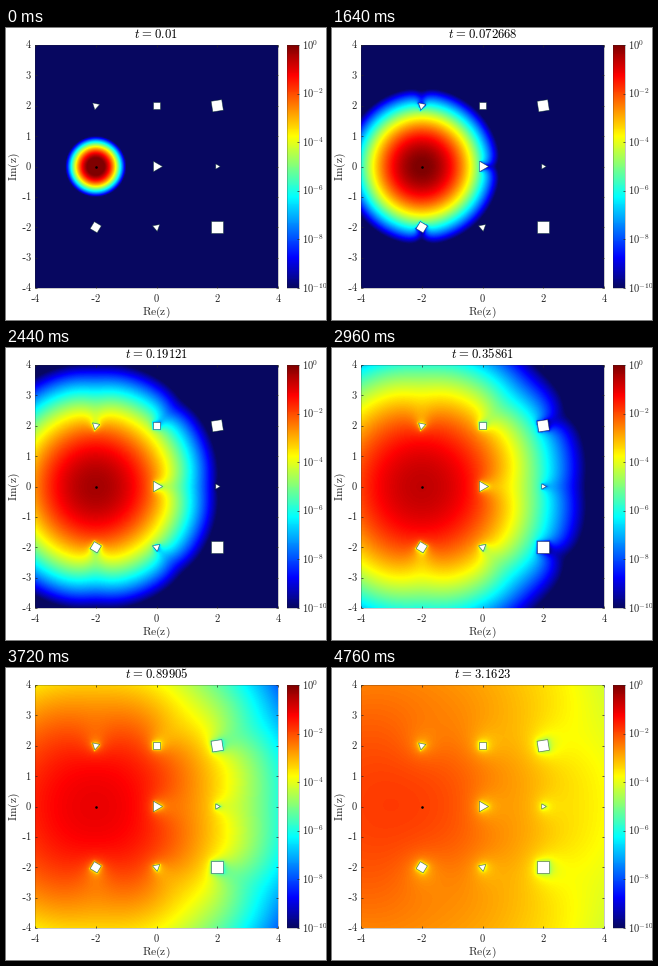
Recreate the animation shown at these times as a matplotlib script. Size 320 by 292 pixels, loop 4.8 s.

```python
import numpy as np
import matplotlib.pyplot as plt
from matplotlib.animation import FuncAnimation
from matplotlib.colors import LinearSegmentedColormap
from matplotlib.path import Path

plt.rcParams["mathtext.fontset"] = "cm"

W, H, DPI = 320, 292, 100
FRAMES, INTERVAL = 120, 40
LEFT, TOP, SIDE = 29, 17, 243
BAR_LEFT, BAR_RIGHT = 281, 293
INK = "#262626"
TICK, LABEL, TITLE = 10.5, 11.5, 12.65  # font sizes in pixels

RAINBOW = LinearSegmentedColormap.from_list("rainbow", [
    (0, (0.03, 0.03, 0.38)), (1 / 8, (0, 0, 1)), (3 / 8, (0, 1, 1)),
    (5 / 8, (1, 1, 0)), (7 / 8, (1, 0, 0)), (1, (0.5, 0, 0))])

SOURCE = (-2, 0)
# centre x, centre y, corner count, circumradius, rotation in degrees
OBSTACLES = [
    (-2, 2, 3, 0.14, 18), (0, 2, 4, 0.17, 45), (2, 2, 4, 0.25, 54),
    (0, 0, 3, 0.20, 0), (2, 0, 3, 0.10, 0),
    (-2, -2, 4, 0.19, 14), (0, -2, 3, 0.14, 40), (2, -2, 4, 0.283, 45),
]

STEP, REACH = 0.04, 5.0
grid = np.linspace(-REACH, REACH, int(round(2 * REACH / STEP)) + 1)
times = np.logspace(-2, 0.5, FRAMES)


def corners(x, y, n, radius, turn):
    a = np.radians(turn) + 2 * np.pi * np.arange(n) / n
    return np.column_stack([x + radius * np.cos(a), y + radius * np.sin(a)])


def blocked_nodes():
    """Grid nodes covered by obstacles, widened by half a cell."""
    gx, gy = np.meshgrid(grid, grid)
    points = np.column_stack([gx.ravel(), gy.ravel()])
    blocked = np.zeros(len(points), bool)
    for x, y, n, radius, turn in OBSTACLES:
        wide = radius + STEP / 2 / np.cos(np.pi / n)
        blocked |= Path(corners(x, y, n, wide, turn)).contains_points(points)
    return blocked.reshape(gx.shape)


def weights(dist, t):
    """Neighbour weights ahead and behind for outward drift plus diffusion."""
    drift = dist / t
    spread = np.maximum(1, np.abs(drift) * STEP / 2)
    ahead = spread / STEP**2 - drift / (2 * STEP)
    behind = spread / STEP**2 + drift / (2 * STEP)
    return ahead, behind, spread.max()


def advance(v, free, dist_x, dist_y, start, end):
    """Step the ratio of the absorbed heat to the free heat kernel."""
    east, west, sx = weights(dist_x, start)
    north, south, sy = weights(dist_y, start)
    steps = int(np.ceil((end - start) * 2 * (sx + sy) / (0.9 * STEP**2)))
    dt = (end - start) / steps
    east, west, north, south = [
        (dt * w).astype(np.float32) for w in (east, west, north, south)]
    east, west = east[:-1], west[1:]
    north, south = north[:-1, None], south[1:, None]
    for _ in range(steps):
        gx, gy = np.diff(v, axis=1), np.diff(v, axis=0)
        v[:, :-1] += gx * east
        v[:, 1:] -= gx * west
        v[:-1] += gy * north
        v[1:] -= gy * south
        v *= free


def solve():
    """Log10 of the heat field at every time."""
    blocked = blocked_nodes()
    free = (~blocked).astype(np.float32)
    v = free.copy()
    dist_x, dist_y = grid - SOURCE[0], grid - SOURCE[1]
    r2 = dist_x[None, :]**2 + dist_y[:, None]**2
    fields = []
    for k, t in enumerate(times):
        if k:
            advance(v, free, dist_x, dist_y, times[k - 1], t)
        kernel = -np.log10(4 * np.pi * t) - r2 / (4 * t) / np.log(10)
        ratio = np.where(blocked, -2, np.log10(np.maximum(v, 1e-30)))
        fields.append(np.clip(kernel + ratio, -10, 0).astype(np.float32))
    return fields


def pixel_axes(left, top, width, height):
    return fig.add_axes([left / W, 1 - (top + height) / H, width / W, height / H])


def write(x, y, tex, size, ha="center", **kw):
    kw.setdefault("color", INK)
    return page.text(x, y, f"${tex}$", fontsize=size * 72 / DPI, ha=ha,
                     va="baseline", **kw)


def stroke(xs, ys, width=0.7, alpha=1):
    page.plot(xs, ys, color=INK, lw=width * 72 / DPI, alpha=alpha,
              solid_capstyle="butt")


def box(left, top, right, bottom):
    stroke([left, right, right, left, left], [top, top, bottom, bottom, top],
           alpha=0.35)


def number(x, y, n):
    """A tick number centred on x, with a short hyphen when negative."""
    if n < 0:
        stroke([x - 4.3, x - 1.5], [y - 2.6, y - 2.6], 0.9)
        x += 1.75
    write(x, y, rf"\mathrm{{{abs(n)}}}", TICK)


def title_text(t):
    return rf"$t\hspace{{0.08}}=\hspace{{0.08}}{t:.5g}$"


fields = solve()

fig = plt.figure(figsize=(W / DPI, H / DPI), dpi=DPI, facecolor="white")

plot = pixel_axes(LEFT, TOP, SIDE, SIDE)
edge = REACH + STEP / 2
heat = plot.imshow(fields[0], cmap=RAINBOW, vmin=-10, vmax=0, origin="lower",
                   extent=(-edge, edge, -edge, edge), aspect="auto",
                   interpolation="bilinear")
for shape in OBSTACLES:
    plot.fill(*corners(*shape).T, facecolor="white",
              edgecolor=(0, 0.15, 0.15, 0.6), lw=0.7 * 72 / DPI)
plot.plot(*SOURCE, "o", color="black", ms=2.6 * 72 / DPI, mew=0)
plot.set(xlim=(-4, 4), ylim=(-4, 4))
plot.axis("off")

bar = pixel_axes(BAR_LEFT, TOP, BAR_RIGHT - BAR_LEFT, SIDE)
bar.imshow(np.linspace(-10, 0, 256)[:, None], cmap=RAINBOW, origin="lower",
           aspect="auto", interpolation="nearest")
bar.axis("off")

page = pixel_axes(0, 0, W, H)
page.set(xlim=(0, W), ylim=(H, 0))
page.axis("off")
page.set_autoscale_on(False)

right, bottom = LEFT + SIDE, TOP + SIDE
middle = LEFT + SIDE / 2
box(LEFT, TOP, right, bottom)
box(BAR_LEFT, TOP, BAR_RIGHT, bottom)

for n in range(-4, 5):
    y = TOP + SIDE * (4 - n) / 8
    number(20.6 if n < 0 else 22.4, y + 3.4, n)
    stroke([LEFT, LEFT + 2.4], [y, y])
    stroke([right - 2.4, right], [y, y])
for n in range(-4, 5, 2):
    x = LEFT + SIDE * (n + 4) / 8
    number(x, 273.7, n)
    stroke([x, x], [bottom - 2.4, bottom])
    stroke([x, x], [TOP, TOP + 2.4])
for power in range(0, -11, -2):
    y = TOP - SIDE * power / 10
    write(295.5, y + 4.6, f"10^{{{power}}}", TICK, ha="left")
    stroke([BAR_RIGHT - 2, BAR_RIGHT], [y, y])

write(middle, 287.3, r"\mathrm{Re(z)}", LABEL)
write(10.4, TOP + SIDE / 2, r"\mathrm{Im(z)}", LABEL,
      rotation=90, rotation_mode="anchor")
title = write(middle, 10.2, "t", TITLE, color="black")
title.set_text(title_text(times[0]))


def draw(k):
    heat.set_data(fields[k])
    title.set_text(title_text(times[k]))
    return heat, title


anim = FuncAnimation(fig, draw, frames=FRAMES, interval=INTERVAL,
                     repeat=True, blit=False)
plt.show()
```
